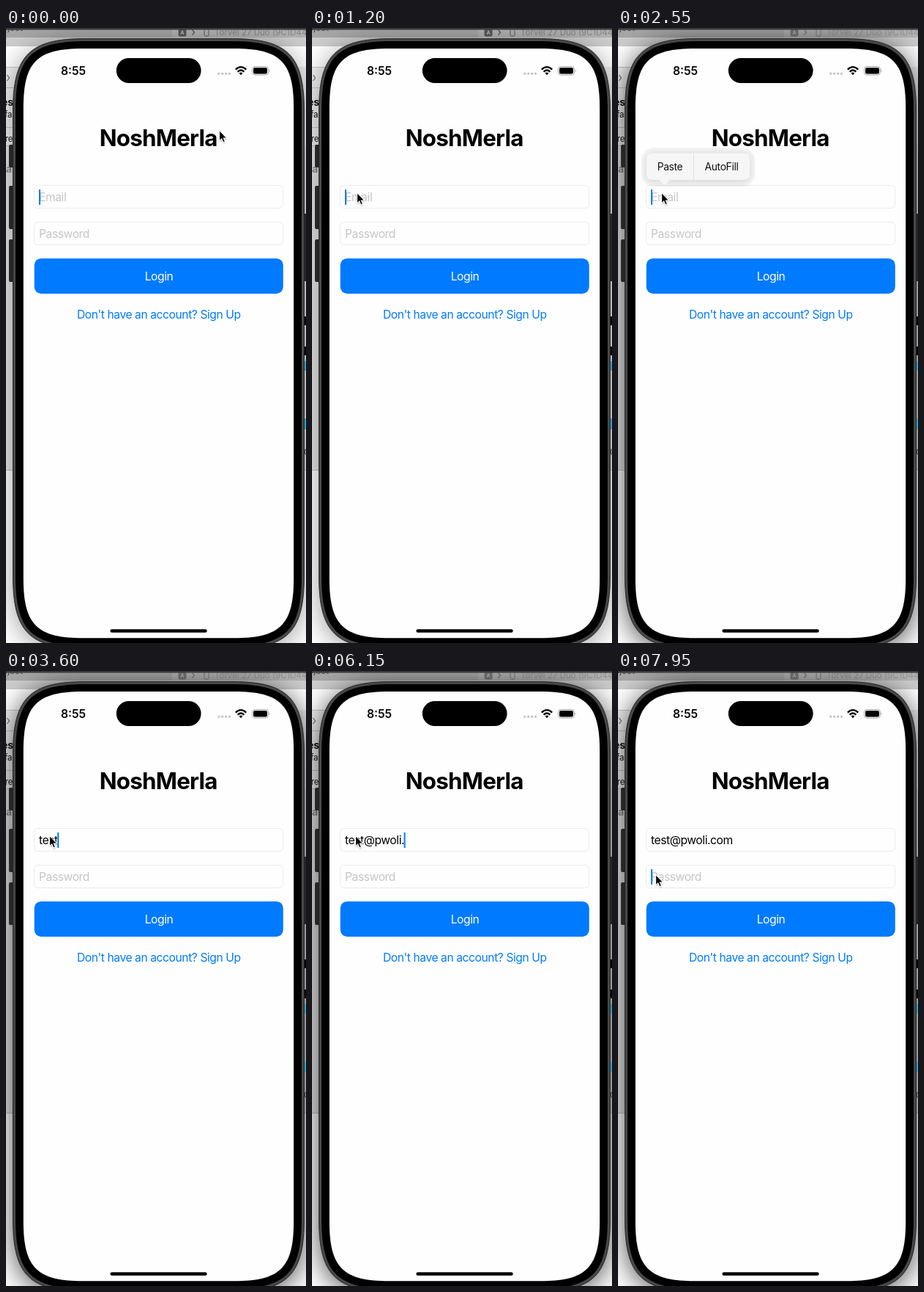
These frames come from a looping animation (410x838 px, 8000 ms). An HTML page:

```html
<!DOCTYPE html>
<html lang="en">
<head>
<meta charset="utf-8">
<title>Login</title>
<style>
  html, body { margin: 0; width: 100%; height: 100%; overflow: hidden; background: #fff; }
  svg { display: block; width: 410px; height: 838px; }
  text { font-family: Inter, "Liberation Sans", sans-serif; white-space: pre; }
  .body { font-size: 15.65px; letter-spacing: -.43px; }
  .hint { fill: #c5c5c7; }
  .mid { text-anchor: middle; }
  .menu { font-size: 13.8px; letter-spacing: -.33px; fill: #111; }
</style>
</head>
<body>
<svg viewBox="0 0 410 838" xmlns="http://www.w3.org/2000/svg">
  <defs>
    <filter id="wide" x="-30%" y="-30%" width="160%" height="160%"><feGaussianBlur stdDeviation="18"/></filter>
    <filter id="glow" x="-30%" y="-60%" width="160%" height="220%"><feGaussianBlur stdDeviation="4"/></filter>
    <filter id="soft" x="-60%" y="-60%" width="220%" height="220%"><feGaussianBlur stdDeviation="1.1"/></filter>
  </defs>

  <!-- window behind the phone -->
  <rect width="410" height="838" fill="#fff"/>
  <rect width="410" height="602" fill="#f0f0f0"/>
  <rect y="13" width="410" height="12" fill="#cdcdcd"/>
  <rect y="25" width="410" height="28" fill="#fff"/>
  <rect y="160" width="410" height="442" fill="#e6e6e6"/>
  <path d="M0 53.5H24M0 81.5H24M0 135.5H24M0 160.5H24M0 602.5H24M393 602.5H410" stroke="#c4c4c4"/>
  <rect width="410" height="13" fill="#a6a6a6"/>
  <rect x="227" width="183" height="13" fill="#b2b2b2"/>
  <g font-size="12" fill="#161616">
    <text x="-5" y="4" fill="#444">oject</text>
    <path d="M1.5 64L4.5 68 1.5 72" fill="none" stroke="#666" stroke-width="1.2"/>
    <text x="-6" y="106" font-size="14" font-weight="700">es</text>
    <text x="-2" y="122" font-size="11.5">far</text>
    <text x="-8" y="155" font-size="11.5">ere</text>
    <text x="0" y="197" font-size="14" font-weight="700" fill="#8d8d8d">a</text>
  </g>
  <g id="tab">
    <rect x="235.500" y="1" width="11" height="10.500" rx="2.500" fill="#4a4a4a"/>
    <path d="M239 9L241 3.500 243 9M239.800 7H242.200" fill="none" stroke="#bbb"/>
    <path d="M254.500 2.500L257.500 6 254.500 9.500" fill="none" stroke="#4a4a4a" stroke-width="1.300"/>
    <rect x="271" y="1" width="6" height="10" rx="1.500" fill="none" stroke="#4a4a4a"/>
    <text x="285" y="10" font-size="11.500" fill="#7c7c7c">Torvel 27 Duo (9C1D44</text>
  </g>
  <path id="shade" filter="url(#wide)"/>
  <rect width="410" height="2.500" fill="#3b3b3d"/>
  <path d="M408 393H410V405H408ZM408 434H410V446H408Z" fill="#000"/>
  <path d="M408 454H410V467H408ZM408 532H410V547H408Z" fill="#34a3cf"/>
  <text x="407" y="582" font-size="12" fill="#333">C</text>

  <!-- phone -->
  <path d="M4 161Q4 159 6 159H10V190H6Q4 190 4 188ZM4 217Q4 215 6 215H10V274H6Q4 274 4 272ZM4 290Q4 288 6 288H10V346H6Q4 346 4 344ZM407 253H410V345H407Z" fill="#262626"/>
  <path id="rim" fill="#484848" stroke="#242424"/>
  <path id="bezel"/>
  <path id="screen" fill="#fefefe"/>
  <rect x="150.800" y="41" width="115.800" height="34" rx="17"/>
  <rect x="142.400" y="819.200" width="132.300" height="4.600" rx="2.300"/>

  <!-- status bar -->
  <text x="75" y="64" font-size="15.650" font-weight="600">8:55</text>
  <g id="dots" fill="#c3c3c5"></g>
  <g fill="none" stroke="#000" stroke-width="2.200">
    <path d="M313.800 56.600Q321 49.800 328.200 56.600"/>
    <path d="M316.600 59.600Q321 55.400 325.400 59.600"/>
  </g>
  <path d="M318.600 61.600Q321 59.600 323.400 61.600L321 64.200Z"/>
  <rect x="336.500" y="52.500" width="22" height="11.500" rx="3.600" fill="none" stroke="#a6a6a6"/>
  <rect x="338" y="54" width="19" height="8.500" rx="2.300"/>
  <path d="M359.700 56.300Q361.700 58.200 359.700 60.200Z" fill="#a6a6a6"/>

  <!-- login form -->
  <text class="mid" x="208.200" y="161.300" font-size="31.300" font-weight="700" letter-spacing="-.75">NoshMerla</text>
  <g fill="#fefefe" stroke="#ebebeb">
    <rect x="38.500" y="214.500" width="340" height="31" rx="5"/>
    <rect x="38.500" y="264.500" width="340" height="31" rx="5"/>
  </g>
  <text id="hint" class="body hint" x="45" y="236.200">Email</text>
  <text id="mail" class="body" x="45" y="236.200"></text>
  <text class="body hint" x="45" y="286.200">Password</text>
  <rect x="38.700" y="313.900" width="340.100" height="48" rx="9.200" fill="#007aff"/>
  <text class="body mid" x="209" y="343.900" fill="#fff">Login</text>
  <text class="body mid" x="208.800" y="395.600" fill="#007aff">Don't have an account? Sign Up</text>
  <rect id="caret" width="2" height="21" fill="#007aff"/>

  <g id="menu">
    <rect x="32" y="163" width="155" height="53" rx="17" opacity=".035"/>
    <rect x="37" y="169" width="145" height="42" rx="12" opacity=".1" filter="url(#glow)"/>
    <path d="M47 170.500H172Q180 170.500 180 178.500V199Q180 207 172 207H72C69 207 66 214 63.500 214S58 207 55 207H47Q39 207 39 199V178.500Q39 170.500 47 170.500Z" fill="#f6f6f6"/>
    <path d="M103.500 170.500V207" stroke="#dedede"/>
    <text class="menu mid" x="71" y="193.700">Paste</text>
    <text class="menu mid" x="141.500" y="193.700">AutoFill</text>
  </g>

  <g id="cursor">
    <path d="M0 1.500V16L3.400 12.900 5.700 18.100 8 17.100 5.800 12.100H10.300Z" opacity=".35" filter="url(#soft)"/>
    <path d="M.6 1.300V13.200L3.400 10.600 5.700 15.800 7.200 15.100 5 10H9Z" stroke="#fff" stroke-width="2" paint-order="stroke"/>
  </g>
</svg>
<script>
const $ = id => document.getElementById(id);
const LOOP = 8000, STEP = 150;
const ADDRESS = 'test@pwoli.com';

// [time, value] pairs that hold until the next one
const typed = [[0, 0], [2850, 1], [3150, 2], [3450, 3], [3600, 4], [4500, 5], [4800, 6],
  [4950, 7], [5250, 9], [5550, 10], [6150, 11], [6300, 12], [6450, 13], [6600, 14]];
const menuAlpha = [[0, 0], [2100, .25], [2250, .6], [2400, .9], [2550, 1],
  [2850, .6], [3000, .2], [3150, 0]];
const caretAlpha = [[0, 1], [300, .5], [450, 0], [750, .5], [900, 1],
  [4200, .5], [4350, 0], [4500, 1], [7200, .5], [7350, 0], [7500, .5], [7650, 1]];

const held = (keys, t) => keys.reduce((v, k) => t >= k[0] ? k[1] : v, 0);
const ease = p => p * p * (3 - 2 * p);
const span = (t, a, b) => ease(Math.min(1, Math.max(0, (t - a) / (b - a))));
const mix = (a, b, p) => a + (b - a) * p;

// rounded box whose corners ease into the straight sides
function smoothBox(x, y, w, h, r) {
  const k = 1.4 * r, c = .315 * r, X = x + w, Y = y + h;
  return `M${x + k} ${y}H${X - k}C${X - c} ${y} ${X} ${y + c} ${X} ${y + k}` +
    `V${Y - k}C${X} ${Y - c} ${X - c} ${Y} ${X - k} ${Y}` +
    `H${x + k}C${x + c} ${Y} ${x} ${Y - c} ${x} ${Y - k}` +
    `V${y + k}C${x} ${y + c} ${x + c} ${y} ${x + k} ${y}Z`;
}

function build() {
  $('shade').setAttribute('d', smoothBox(9, 20, 399, 830, 70));
  $('rim').setAttribute('d', smoothBox(9.5, 14.5, 398, 831, 71));
  $('bezel').setAttribute('d', smoothBox(13, 18, 391, 824, 68));
  $('screen').setAttribute('d', smoothBox(23.8, 28, 369.4, 803.2, 58));
  for (let i = 0; i < 4; i++) {
    const dot = document.createElementNS('http://www.w3.org/2000/svg', 'circle');
    dot.setAttribute('cx', 290.8 + i * 4.9);
    dot.setAttribute('cy', 62.2);
    dot.setAttribute('r', 1.6);
    $('dots').append(dot);
  }
}

function cursorAt(t) {
  if (t < 1200) {
    const p = span(t, 0, 1050);
    return [mix(291.5, 64, p), mix(139.5, 230, p)];
  }
  if (t < 1350) return [61.5, 224.5];
  const p = span(t, 7050, 7650);
  return [mix(59.5, 51.5, p), mix(224.5, 277.5, p)];
}

function draw(time) {
  const t = Math.floor(time / STEP) * STEP;
  const active = t >= 1350;
  $('shade').setAttribute('opacity', active ? .68 : .38);
  $('tab').setAttribute('opacity', active ? .55 : .85);

  const count = held(typed, t);
  $('hint').setAttribute('visibility', count ? 'hidden' : 'visible');
  $('mail').textContent = ADDRESS.slice(0, count);

  const onPassword = t >= 7950;
  const width = count && !onPassword ? $('mail').getComputedTextLength() - .5 : 0;
  $('caret').setAttribute('x', 45 + width);
  $('caret').setAttribute('y', onPassword ? 270 : 220);
  $('caret').setAttribute('opacity', held(caretAlpha, t));

  $('menu').setAttribute('opacity', held(menuAlpha, t));
  $('cursor').setAttribute('transform', `translate(${cursorAt(t)})`);
}

build();
const start = performance.now();
function tick() {
  draw((performance.now() - start) % LOOP);
  requestAnimationFrame(tick);
}
tick();
</script>
</body>
</html>
```
